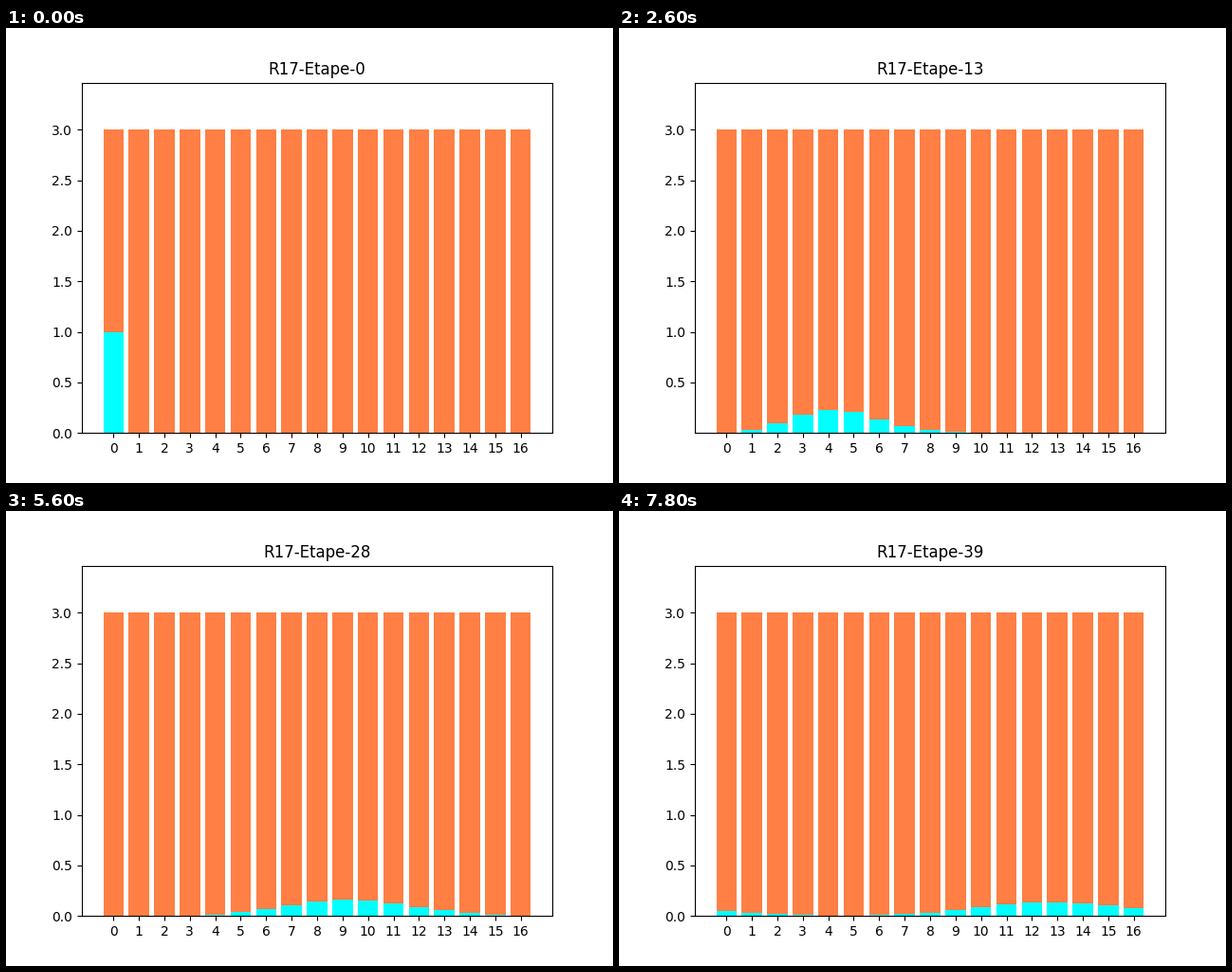
A matplotlib script that plays this animation: 640x480 px, repeating every 8000 ms.

```python
import numpy as np
import matplotlib.pyplot as plt
from matplotlib.animation import FuncAnimation

SITES = 17      # positions on the ring
STEPS = 40
MOVE = 1 / 3    # chance of moving one site to the right
TOP = 3.0
ORANGE = "#ff7f44"


def ring_walk():
    """Probability of each site after every step, starting at site 0."""
    p = np.zeros(SITES)
    p[0] = 1.0
    rows = [p]
    for _ in range(STEPS - 1):
        p = (1 - MOVE) * p + MOVE * np.roll(p, 1)
        rows.append(p)
    return rows


plt.rcParams["font.family"] = "DejaVu Sans"
fig, ax = plt.subplots(figsize=(6.4, 4.8), dpi=100)
walk = ring_walk()
sites = np.arange(SITES)
lower = ax.bar(sites, walk[0], color="cyan")
upper = ax.bar(sites, TOP - walk[0], bottom=walk[0], color=ORANGE)
ax.set_xticks(sites)
ax.set_yticks(np.arange(0, 3.1, 0.5))
title = ax.set_title("")


def draw(step):
    p = walk[step]
    for low, high, value in zip(lower, upper, p):
        low.set_height(value)
        high.set_y(value)
        high.set_height(TOP - value)
    # The axis starts at the largest negligible bar, which can drop the 0.0 tick.
    floor = p[p <= 1e-5 * TOP].max(initial=0.0)
    ax.set_ylim(floor, 1.155 * TOP)
    title.set_text(f"R{SITES}-Etape-{step}")
    return [*lower, *upper, title]


anim = FuncAnimation(fig, draw, frames=STEPS, init_func=lambda: draw(0),
                     interval=200, repeat=True, repeat_delay=0, blit=False)
plt.show()
```
